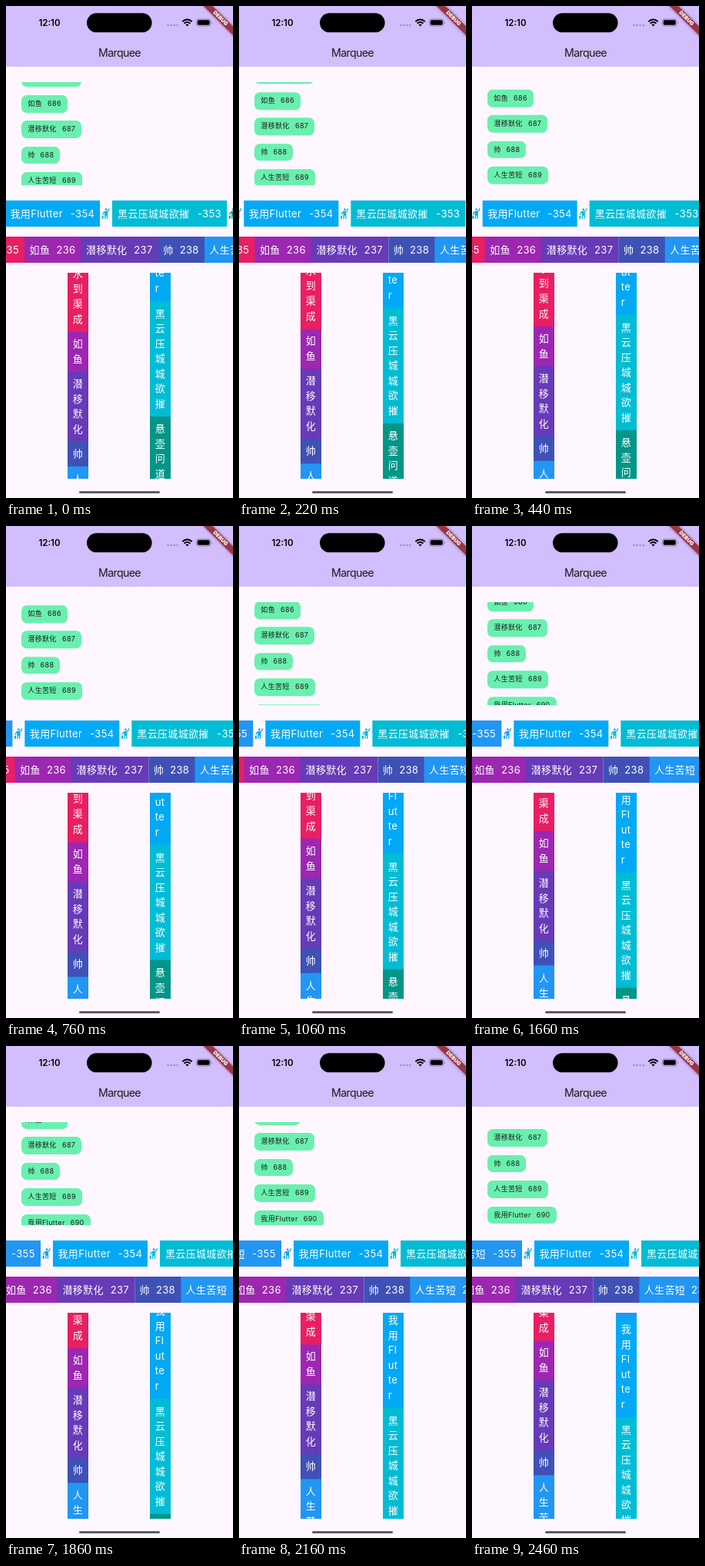
These frames come from a looping animation (295x640 px, 2500 ms). An HTML page:

```html
<!DOCTYPE html>
<html lang="zh-CN">
<head>
<meta charset="utf-8">
<title>Marquee</title>
<style>
html, body { margin: 0; width: 100%; height: 100%; overflow: hidden; }
body { background: #fef7ff; font-family: Inter, "Noto Sans CJK SC", "Noto Sans CJK", sans-serif; }
#stage { position: relative; width: 295px; height: 640px; overflow: hidden; background: #fef7ff; color: #1d1b20; }
#stage > * { position: absolute; }
.bar { left: 0; top: 0; width: 295px; height: 79px; background: #d2bdfd; }
.title { left: 0; width: 295px; top: 51px; line-height: 20px; text-align: center; font-size: 14.2px; letter-spacing: -.65px; }
.clock { left: 36px; width: 41px; top: 14px; line-height: 16px; text-align: center; font-size: 11.5px; font-weight: 600; color: #000; }
.top { left: 0; top: 0; }
.debug { left: 241px; top: 12.4px; width: 75px; height: 8.2px; line-height: 8.2px; text-align: center; transform: rotate(45deg);
  background: #9c3545; box-shadow: 0 0 4px #0007; color: #fff; font-size: 6.8px; font-weight: 900; }
.home { left: 95px; top: 631px; width: 105px; height: 3px; border-radius: 2px; background: #625c66; }
.view { overflow: hidden; }
.strip { position: absolute; left: 0; top: 0; }
.strip > * { position: absolute; box-sizing: border-box; white-space: nowrap; }
.chip { left: 0; height: 22.8px; padding: 0 8px; border-radius: 6.8px; background: #69f0ae;
  display: flex; justify-content: space-between; line-height: 22px; font-size: 9px; letter-spacing: .34px; }
.cell { top: 0; height: 34px; line-height: 34px; color: #fff; }
.cell > div { box-sizing: border-box; padding: 0 6.8px; display: flex; justify-content: space-between; }
.tall { left: 0; width: 27px; padding: 6.5px 0 0 6.8px; line-height: 19.55px; color: #fff; }
.cell, .tall { font-size: 13px; letter-spacing: .34px; }
</style>
</head>
<body>
<div id="stage">
  <div class="bar"></div>
  <div class="clock">12:10</div>
  <svg class="top" width="295" height="40">
    <rect x="105" y="9.300" width="84.600" height="25" rx="12.500"/>
    <g fill="#a08fc6">
      <circle cx="210.500" cy="25" r="1.300"/><circle cx="214.500" cy="25" r="1.300"/>
      <circle cx="218.500" cy="25" r="1.300"/><circle cx="222.500" cy="25" r="1.300"/>
    </g>
    <g fill="none" stroke="#000" stroke-width="1.900">
      <path d="M229.300 20.200Q235.500 14.600 241.700 20.200"/>
      <path d="M231.600 22.700Q235.500 19.300 239.400 22.700"/>
    </g>
    <path d="M233.500 24.400Q235.500 22.800 237.500 24.400L235.500 26.500Z"/>
    <rect x="247.400" y="17" width="18.600" height="9" rx="2.800" fill="none" stroke="#000" stroke-opacity=".4" stroke-width=".8"/>
    <rect x="248.700" y="18.300" width="16" height="6.400" rx="1.700"/>
    <path d="M267 20Q268.600 21.500 267 23Z" fill-opacity=".5"/>
  </svg>
  <div class="title">Marquee</div>
  <div class="debug">DEBUG</div>
  <div class="home"></div>
</div>
<script>
const stage = document.getElementById('stage');
const LOOP = 2500;
const RED = '#e91e63', PURPLE = '#9c27b0', DEEP = '#673ab7', INDIGO = '#3f51b5',
  BLUE = '#2196f3', SKY = '#03a9f4', CYAN = '#00bcd4', TEAL = '#009688';
const WATER = '水到渠成', FISH = '如鱼', QUIET = '潜移默化', COOL = '帅', LIFE = '人生苦短',
  CODE = '我用Flutter', CLOUD = '黑云压城城欲摧', POT = '悬壶问道';
const HAIL = 'M12 6c-1.100 0-2-.9-2-2s.9-2 2-2 2 .9 2 2-.9 2-2 2zM17 2h2c0 2.700-.93 4.410-2.300 5.500' +
  '-.5.4-1.100.7-1.700.9V22h-2v-6h-2v6H9V10.100c-.3.1-.5.2-.6.3C7.940 10.760 7 11.500 7 14H5c0-2.700.93-4.410 2.300-5.500' +
  'C8.500 7.570 10 7 12 7s2.680-.46 3.480-1.060C15.960 5.550 17 4.760 17 2zM4 16h3v6H4z';

const strips = [];

// A clipped window holding a strip that moves at (vx, vy) px per second.
function marquee(x, y, w, h, vx, vy) {
  const view = document.createElement('div');
  view.className = 'view';
  view.style.cssText = `left:${x}px;top:${y}px;width:${w}px;height:${h}px`;
  const strip = document.createElement('div');
  strip.className = 'strip';
  view.append(strip);
  stage.append(view);
  strips.push({ strip, vx, vy });
  return strip;
}

function add(strip, cls, css, html) {
  const el = document.createElement('div');
  el.className = cls;
  el.style.cssText = css;
  el.innerHTML = html;
  strip.append(el);
}

const pair = (word, num) => `<span>${word}</span><span>${num}</span>`;

const chips = marquee(20.3, 99, 274, 134, 0, -16.67);
[[WATER, 78], [FISH, 59.5], [QUIET, 78], [COOL, 50], [LIFE, 78.5], [CODE, 89.3]].forEach(([word, w], i) =>
  add(chips, 'chip', `top:${-16.5 + i * 33.4}px;width:${w}px`, pair(word, 685 + i)));

// Touching cells overlap by a pixel so that no seam shows between them.
function row(strip, x, gap, num, cells) {
  const lap = gap ? 0 : 1;
  for (const [word, w, color] of cells) {
    if (gap) add(strip, '', `left:${x - gap}px;top:8.5px;width:${gap}px;height:${gap}px`,
      `<svg width="${gap}" height="${gap}" viewBox="0 0 24 24" fill="${color}" style="display:block"><path d="${HAIL}"/></svg>`);
    add(strip, 'cell', `left:${x}px;width:${w + lap}px;background:${color}`,
      `<div style="width:${w}px">${pair(word, num++)}</div>`);
    x += w + gap;
  }
}
row(marquee(0, 253, 295, 34, 33.33, 0), -124.1, 16.2, -355,
  [[LIFE, 106.6, BLUE], [CODE, 123.3, SKY], [CLOUD, 148.5, CYAN], [POT, 106.6, TEAL]]);
row(marquee(0, 300, 295, 34, -16.5, 0), -76.2, 0, 235,
  [[WATER, 100, RED], [FISH, 73.5, PURPLE], [QUIET, 100.2, DEEP], [COOL, 60, INDIGO], [LIFE, 100, BLUE]]);

function column(strip, y, cells) {
  for (const [word, color] of cells) {
    const lines = word.match(/[a-z]{1,2}|./gi);
    const h = lines.length * 19.55 + 13;
    add(strip, 'tall', `top:${y}px;height:${h + 1}px;background:${color}`, lines.join('<br>'));
    y += h;
  }
}
column(marquee(80, 347, 27, 267.5, 0, -16.5), -14.6,
  [[WATER, RED], [FISH, PURPLE], [QUIET, DEEP], [COOL, INDIGO], [LIFE, BLUE]]);
column(marquee(187, 347, 27, 267.5, 0, 40.2), -184.5,
  [[LIFE, BLUE], [CODE, SKY], [CLOUD, CYAN], [POT, TEAL]]);

// The picture holds between ticks: uneven at first, then every 100 ms.
const EARLY = [440, 340, 220, 120, 0];
const hold = t => t < 560 ? EARLY.find(s => t >= s) : 560 + Math.floor((t - 560) / 100) * 100;

const start = performance.now();
function draw(now) {
  const t = hold(Math.max(0, now - start) % LOOP) / 1000;
  for (const { strip, vx, vy } of strips)
    strip.style.transform = `translate(${vx * t}px, ${vy * t}px)`;
  requestAnimationFrame(draw);
}
draw(start);
</script>
</body>
</html>
```
